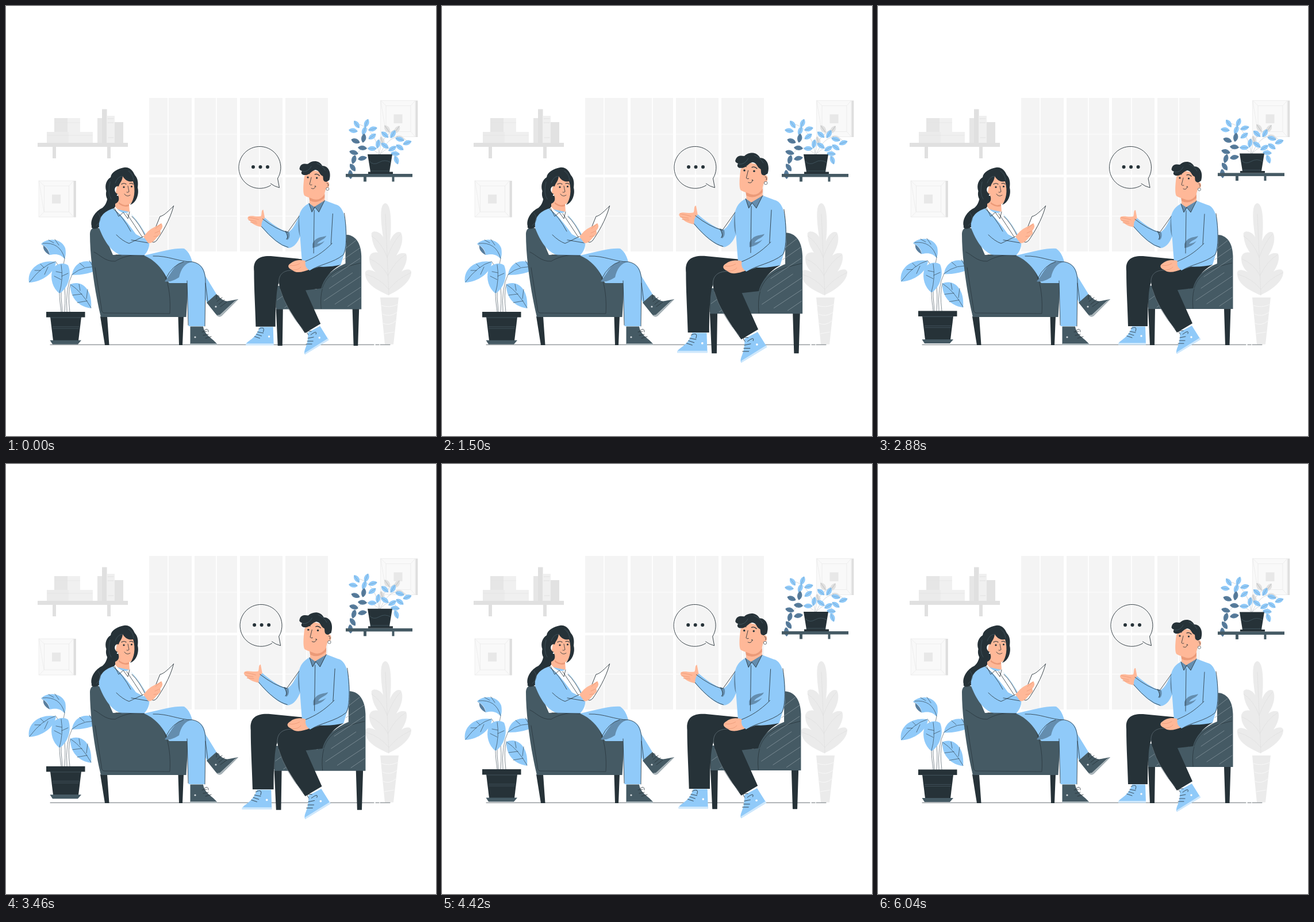
These frames come from a looping animation (748x748 px, 6.08 s). An HTML page:

```html
<!DOCTYPE html>
<html lang="en">
<head>
<meta charset="utf-8">
<title>Conversation</title>
<style>
html, body { margin: 0; width: 100%; height: 100%; overflow: hidden; background: #fff; }
svg { display: block; width: 100%; height: 100%; }
path { stroke-linecap: round; stroke-linejoin: round; }
</style>
</head>
<body>
<svg id="stage" viewBox="0 0 748 748"></svg>
<script>
const BLUE = '#90caf9', SHADE = '#587d9d', FOLD = '#648dae', DARK = '#263238', SLATE = '#455a64', SKIN = '#ffb898', SKIN2 = '#eb9a78';

const fill = (color, d) => `<path fill="${color}" d="${d}"/>`;
const line = (d, color = DARK, w = .8) => `<path fill="none" stroke="${color}" stroke-width="${w}" d="${d}"/>`;
const rect = (color, x, y, w, h) => `<rect fill="${color}" x="${x}" y="${y}" width="${w}" height="${h}"/>`;
const dot = (x, y, r, color = DARK) => `<circle cx="${x}" cy="${y}" r="${r}" fill="${color}"/>`;
const group = (id, ...parts) => `<g id="${id}">${parts.join('')}</g>`;

function windowPanes() {
  const splits = [33, 38, 34, 37];
  let out = '';
  splits.forEach((s, i) => {
    const x = 249 + i * 79;
    for (const [y, h] of [[160, 62.5], [223.5, 70], [298, 67], [366, 61]])
      out += rect('#f4f4f4', x, y, s - .8, h) + rect('#f4f4f4', x + s + .8, y, 73.2 - s, h);
  });
  return out;
}

function picture(x, y) {
  const edge = '#e8e8e8';
  return `<g transform="translate(${x} ${y})">` +
    rect('#f9f9f9', 0, 0, 61, 63.5) + rect('#dedede', 60.5, 0, 3.8, 63.5) +
    line('M0 0H60V63H0ZL9 9H52V54H9ZM60 0L52 9M60 63L52 54M0 63L9 54M9 9V54', edge, .7) +
    rect('#e8e8e8', 22.5, 24, 15, 15.5) + '</g>';
}

const bookshelf = () =>
  rect('#e0e0e0', 55, 238, 157, 7) + rect('#e0e0e0', 81, 245, 6, 20) + rect('#e0e0e0', 176, 245, 6, 20) +
  rect('#e6e6e6', 84, 195, 23, 24) + rect('#f0f0f0', 107, 195, 22, 24) +
  rect('#ebebeb', 71, 219, 38, 19) + rect('#f0f0f0', 109, 219, 42, 19) +
  line('M85 203H128M72 225H150', '#e0e0e0', .6) +
  rect('#e6e6e6', 159, 195, 8, 43) + rect('#e0e0e0', 167, 179.5, 8.5, 58.5) +
  rect('#f0f0f0', 175.5, 191, 13.5, 47) + rect('#e2e2e2', 189, 202, 15, 36) +
  line('M177 196H187M177 203H187M178 229H187M169 187H174', '#dedede', .8);

const grayPlant = () =>
  fill('#ebebeb', 'M660 343C649 344 652 374 656 402C650 390 633 389 636 399C637 412 641 420 647 429C639 427 631 431 632 441C633 452 638 458 643 463C632 457 623 458 625 468C628 487 650 496 665 503C686 494 705 478 705 463C704 456 694 458 688 462C696 451 699 438 696 431C690 428 684 431 679 434C689 419 692 403 687 394C680 390 672 398 668 409C671 385 671 344 660 343Z') +
  line('M660 362L666 503M636 400Q654 412 663 437M686 397Q674 409 663 437M633 440Q654 448 665 470M695 433Q678 442 665 468M627 467Q651 474 666 493M704 464Q681 474 666 493', '#dedede', .7) +
  fill('#ebebeb', 'M651 507H683L674 588.5H659Z') +
  line('M653 521Q667 526 682 519M655 536Q668 542 680 533M656 552Q667 557 678 548M658 570L675 567', '#f8f8f8', 1);

// A leaf is a pointed oval with a midrib
function leaf([x, y, turn], color) {
  return `<g transform="translate(${x} ${y}) rotate(${turn})">` +
    fill(color, 'M-8 0C-4 -6 4 -5.5 8 0C4 5 -4 5.5 -8 0Z') +
    line('M-7 0H7', 'rgba(38,50,56,.35)', .5) + '</g>';
}
const leaves = (list, color) => list.map(v => leaf(v, color)).join('');

const shelfPlant = () => group('shelf',
  line('M649 258C646 232 632 208 610 205M649 258C630 240 606 238 600 296M651 258C666 222 690 222 700 238M651 258C670 237 684 248 679 270M650 258Q648 230 680 213', '#b5bdc2', .6),
  leaves([[663, 214, 55], [680, 215, 125], [686, 230, 25], [654, 235, 75]], '#e0e0e0'),
  leaves([[610, 206, 55], [627, 204, 112], [604, 217, 8], [623, 217, 110], [638, 214, -15], [637, 227, 145], [659, 224, 40], [673, 223, 120], [685, 232, 15], [698, 238, -20], [647, 240, 100], [637, 248, 0], [659, 243, 35], [672, 248, 150], [685, 246, 35], [677, 257, 5], [679, 268, 70]], BLUE),
  leaves([[608, 235, 20], [622, 230, 100], [620, 247, 5], [605, 255, 15], [620, 265, -10], [605, 267, 105], [603, 281, 55], [599, 293, 85]], SHADE),
  rect(SLATE, 591, 292, 116, 5.5), rect(SLATE, 622, 297, 5, 8.5), rect(SLATE, 671.5, 297, 4, 8.5),
  fill(DARK, 'M629 258H672L667 288.5H673V292H630V288.5H634Z'),
  line('M632 270Q639 278 649 272T669 272M634 287H667', SLATE, .8));

const floorPlant = () => group('plant',
  line('M102 439Q92 480 98 532M86 444Q107 470 102 532M93 500Q93 510 96 532M115 467Q103 490 106 532M112 484Q107 500 111 532', '#52616a', .7),
  fill(BLUE, 'M61 414C71 403 96 403 103 421C105 431 103 438 102 440C94 431 87 431 76 433C75 424 70 418 61 414Z'),
  fill(SHADE, 'M61 414C69 418 74 424 76 433C68 429 64 423 65 417Z'),
  fill(BLUE, 'M40 481C36 458 58 440 87 445C85 464 63 480 40 481Z'),
  fill(BLUE, 'M80 462C81 450 99 444 108 451C116 470 106 493 93 500C81 491 77 474 80 462Z'),
  fill(BLUE, 'M115 468C116 449 139 432 166 455C151 465 132 468 115 468Z'),
  fill(BLUE, 'M112 484C131 476 151 492 148 526C125 523 111 506 112 484Z'),
  line('M64 413Q94 410 102 439M74 407L83 412M85 406L92 416M85 445Q63 451 41 480M50 460L60 460M60 449L66 455M67 467L73 454M96 450Q100 475 93 499M84 470L96 476M108 465L97 470M87 462L97 464M115 467Q137 449 165 455M128 447L136 454M145 443L151 453M113 485Q132 497 148 525M127 484L129 495M116 503L132 501M142 493L140 509M124 516L141 513', DARK, .6),
  rect(DARK, 70, 532, 67.5, 9.5), fill(DARK, 'M77 541H131L126 582H82Z'), fill(SLATE, 'M76.5 581.5H131L125 588.5H81Z'),
  line('M78 542H130M81 558H127M82 561H126', '#52666f', .6));

const bubble = () => group('bubble',
  line('M460.5 312A36.5 36.5 0 1 1 472.5 300L475.5 316Q467 314 460.5 309', DARK, .9),
  dot(430, 280, 3), dot(442.5, 280, 3), dot(455, 280, 3));

const womanChair = () =>
  fill(DARK, 'M164 540H176L179.5 590H172ZM299.5 540H309L307 590H301Z') +
  fill(SLATE, 'M146 397C146 382 161 383 168 391L186 433C205 433 228 430 247 435C270 445 278 462 283 481L317 482L313.5 541H165C155 500 146 440 146 397Z') +
  line('M153 428C163 432 172 445 190 444C208 433 231 431 248 436C274 447 288 485 285 535L171 534Q166 534 166 525L155 455', DARK, .7);

const woman = () =>
  // Hair tail
  fill(DARK, 'M184 303C175 320 181 340 168 351C155 357 146 371 149 383C147 388 157 389 161 385C180 379 193 369 196 350Z') +
  fill(SKIN, 'M190 330V352C198 361 210 365 215 358L214 343Z') +
  fill(SKIN2, 'M196 341Q207 350 214 344L214 348Q205 351 196 344Z') +
  // Crossed leg, then standing leg
  fill(BLUE, 'M325 462L347 470L366 501L350 517Z') +
  fill(BLUE, 'M240 434C260 430 292 420 310 422C319 428 322 438 324 445C343 448 348 462 347 480L346 557H317.5L315 482H284C275 461 262 443 240 434Z') +
  fill(FOLD, 'M276 479C287 468 291 449 309 445L324 445C311 447 304 458 301 472C293 477 284 481 276 479Z') +
  line('M256 435C282 434 300 445 324 445C341 448 347 462 347 480L346 557M315 478L317 555M278 474Q290 450 309 445M347 482L351 514') +
  // Shoes
  fill(SLATE, 'M349 516L366 501C374 510 380 515 388 513L404 510L375 539Q370 542 365 536Z') +
  fill('#a9b4b9', 'M404 509.5L374 540Q370 542 366 538L372 537L398 513Z') +
  fill(SLATE, 'M320.5 557.5H343C345 573 361 579 367 588H320.5Z') +
  fill('#a9b4b9', 'M320.5 587H366L367.5 590H320.5Z') +
  line('M367 514L376 507M370 519L380 511M373 523L384 515M366 510Q365 500 371 505M341 567L349 566M343 573L352 571M347 578L357 575M344 565Q352 558 352 567') +
  dot(365, 523, 1.6, '#d4dade') + dot(329, 576, 1.6, '#d4dade') +
  // Jacket and blouse
  fill(BLUE, 'M187 352C170 357 160 368 162 386C171 410 184 429 202 434L240 434C247 427 250 418 249 411L244 399C235 382 225 369 214 358Z') +
  fill('#fff', 'M187 353L190 349C198 360 209 363 215 357L221 367C230 377 239 389 243 402L239 404L226 397C213 379 201 363 187 353Z') +
  line('M189 352L196 366L204 359L212 370L215 358M210 361Q224 382 237 402M187 353Q204 367 217 392M219 366Q232 378 243 402M192 398Q203 409 214 413L239 401M191 433L240 434M218 407L247 412') +
  // Paper and hand
  `<path fill="#fff" stroke="${DARK}" stroke-width=".9" d="M291.5 348C283 356 275 365 268 366L251 408Q256 414 262 408C271 395 285 373 291.5 348Z"/>` +
  fill(SKIN, 'M239 401L247 392C254 386 260 384 270 378C274 382 272 387 268 391C271 395 268 398 265 400L258 408Q252 414 247 412Z') +
  line('M270 379L260 387M268 391L259 395M265 400L257 401', SKIN2, .8) +
  // Head
  fill(SKIN, 'M194 305L203 296L222 303C227 316 226 332 220 341C214 348 203 346 198 342L190 330Z') +
  fill(DARK, 'M190 344C178 343 172 333 174.5 322C171 312 175 302 182 298C183 289 194 283 205 281C215 279 221 287 224 294C230 300 230 309 229 316C232 327 227 342 216 346C223 337 226 321 221 305C211 307 206 301 203 296C202 306 197 308 196 314C189 311 186 323 194 327C198 335 197 341 190 344Z') +
  line('M203 296Q194 296 190 308M181 306Q176 326 183 336M213 287Q221 292 222 303M160 360Q170 372 157 382', SLATE, .7) +
  dot(205, 315, 1.6) + dot(218.5, 314, 1.6) +
  line('M201 310Q205 307 209 310M215 309Q219 307 221 310', DARK, 1.1) +
  line('M212 313L214 323Q212 325 210 324M206 327Q210 333 216 329') + dot(194, 329, 1.2, '#fff');

const manChair = () =>
  fill(DARK, 'M470 526H482L481 590H473ZM602 526H613.5L611.5 590H604Z') +
  fill(SLATE, 'M590 398C606 398 617 411 617.5 435V527H470V486L540 492C550 473 572 455 590 448Z') +
  line('M550 492Q546 506 548 526M550 490C560 460 587 454 616 447M470 490V524', DARK, .7) +
  line('M590 422L608 408M586 441L615 421M567 471L615 439M562 491L602 464M553 512L616 470M572 518L616 489M485 524L512 506M594 522L616 507M472 511L486 501', '#8b9aa2', .7);

const man = () => group('man', manChair(),
  // Trousers
  fill(DARK, 'M432 461C430 442 440 434 461 435L522 441L520 465L478 476C470 482 469 525 469 557H435C434 522 432 490 432 461Z'),
  fill(DARK, 'M475 481C473 464 486 460 501 460L520 445L582 450C565 459 552 475 548 491L521 494L547 552L520 568C497 535 478 507 475 481Z'),
  line('M475 483C473 463 488 458 503 460M477 492Q488 529 517 562', '#66757d', .7),
  // Shoes
  fill(BLUE, 'M442 557.5H465L466 589H418C418 581 434 581 442 557.5Z'),
  fill(BLUE, 'M525 567L546 556L561 580L520 605C516 597 527 590 525 567Z'),
  fill('#cfe8fc', 'M418 586H466V589.5H418ZM520 602L560 577L561 580L520 605Z'),
  line('M433 574L442 577M436 570L445 573M438 566L448 568M440 561Q452 555 448 566M522 587L532 587M524 582L534 582M525 577L535 575M526 571Q518 563 531 565M530 571Q542 562 539 570'),
  dot(458, 574, 1.7, '#fff'), dot(545, 576, 1.7, '#fff'),
  // Gesturing arm
  fill(SKIN, 'M451 371L448 355C444 355 446 363 444 366C436 368 428 364 422 367Q419 371 425 374C429 381 439 384 446 385Z'),
  line('M423 368Q434 370 440 372M423 373L436 375M426 377L437 378', SKIN2, .8),
  fill(BLUE, 'M516 354C506 371 502 389 490 394C475 388 462 379 451 369Q444 374 445 385C461 403 478 419 493 421C505 418 509 407 513 398Z'),
  fill(FOLD, 'M486 391L493 394Q495 403 490 407Q487 407 489 403Q490 398 486 391ZM510 363L512 402Q506 390 510 363Z'),
  // Shirt
  fill(BLUE, 'M527 344C518 348 511 357 510 367C511 397 513 420 515 445C532 456 561 455 582 450L588 430C593 414 592 395 591 382C589 361 583 348 573 346L552 338Z'),
  fill(FOLD, 'M533 414C539 401 549 403 557 400C554 407 545 407 541 414Q548 413 554 409Q546 419 533 421Z'),
  fill(SKIN, 'M528 458C518 462 505 466 498 459C490 456 489 451 496 447C502 442 511 441 520 443Z'),
  line('M494 451Q502 453 511 448M498 459Q508 460 513 454', SKIN2, .8),
  fill(BLUE, 'M570 355C590 358 591 389 591 405C593 424 588 435 577 441C560 450 544 452 528 460Q518 453 521 444C538 436 552 427 565 414Z'),
  line('M588 361C592 387 593 423 586 433C569 447 543 450 529 460M521 444C536 438 550 430 567 413M568 362L565 414M536 356L535 430M447 371Q470 389 490 394L510 366M445 384Q471 415 491 420M486 392Q493 403 488 406'),
  // Head
  fill(SKIN, 'M528 330V344L535 351Q549 350 554 340V318Z'),
  fill(SKIN2, 'M527 333Q544 344 554 328V334Q541 346 528 339Z'),
  fill(SKIN, 'M519 297C517 311 516 329 520 331C530 337 548 337 554 326L556 319C564 318 564 306 557 306L553 291L530 286Z'),
  fill(DARK, 'M511 282C513 275 519 275 525 276C531 270 544 268 550 279C561 279 566 291 562 304L557 307C550 306 552 301 551 297C544 294 546 287 538 286C532 287 529 294 522 295C515 296 512 292 515 288Q509 286 511 282Z'),
  line('M516 289Q526 290 531 280M541 275Q550 278 555 287', SLATE, .7),
  dot(525, 299, 1.6), dot(540.5, 300, 1.6),
  line('M521 294Q524 291 528 293M537 294Q541 292 545 296', DARK, 1.2),
  line('M531 299L528 311Q529 313 532 312M531 318Q537 321 538 314M537 314L539 315M558 309Q561 309 560 314'),
  `<circle cx="559" cy="319" r="2.5" fill="#fff" stroke="${DARK}" stroke-width=".6"/>`,
  fill(FOLD, 'M527 344L532 359L538 351L544 359L554 339L536 350Z'),
  line('M527 344L532 359L537 350L544 359L554 339'));

document.getElementById('stage').innerHTML = windowPanes() + bookshelf() + picture(57.5, 304) + picture(652, 164.5) +
  grayPlant() + line('M77 589.2H640M643 589.2H649M651 589.2H668', DARK, .7) +
  floorPlant() + shelfPlant() + bubble() + womanChair() + woman() + man();

// Linear interpolation through [time, value] points
function track(t, points) {
  const i = points.findIndex(p => p[0] > t);
  if (i < 0) return points[points.length - 1][1];
  const [t0, a] = points[i - 1], [t1, b] = points[i];
  return a + (b - a) * (t - t0) / (t1 - t0);
}
const LOOP = 6080;
const BEAT = [[0, 1], [300, 1.1], [900, 1], [1200, 1], [1500, 1.1], [1800, 1]];
const SHAKE = [0, -1, 2, -4, 4, -4, 4, -4, 2, -1, 0].map((x, i) => [i * 600, x]);
const FLOAT = [[0, 0], [750, -10], [1500, 0]];
const move = (id, value) => document.getElementById(id).setAttribute('transform', value);

function draw(now) {
  const t = now % LOOP;
  const y = track(t % 1500, FLOAT);
  move('plant', `translate(0 ${y})`);
  move('shelf', `translate(0 ${y})`);
  move('bubble', `translate(${track(t, SHAKE)} 0)`);
  const beat = t + 20 < LOOP ? (t + 20) % 3040 : 0;
  move('man', `translate(514 438) scale(${track(beat, BEAT)}) translate(-514 -438)`);
}
const start = performance.now();
function tick() {
  draw(performance.now() - start);
  requestAnimationFrame(tick);
}
tick();
</script>
</body>
</html>
```
